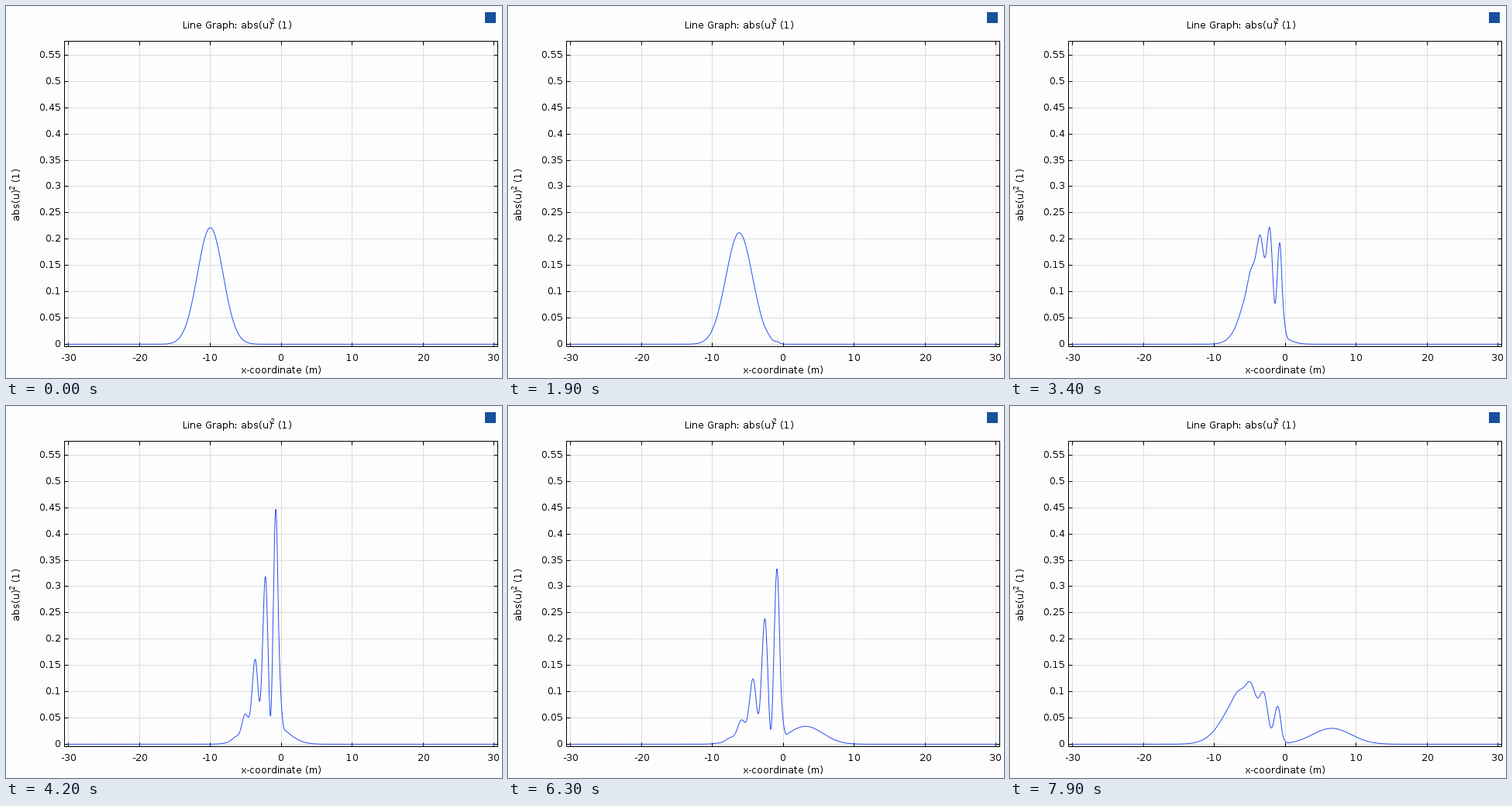
Animation of 640x480 px, one loop 8 s. Source, as a matplotlib script:

```python
import numpy as np
import matplotlib.pyplot as plt
from matplotlib.animation import FuncAnimation
from matplotlib.patches import Rectangle

W, H, DPI = 640, 480, 100
PT = 72 / DPI  # points per pixel
FRAMES, INTERVAL = 80, 100
BLUE, GRID = "#2a52f0", "#dcdcdc"
LEFT, RIGHT, TOP, BOTTOM = 75.5, 634.5, 45.5, 439.5

plt.rcParams.update({
    "font.family": "DejaVu Sans",
    "text.hinting": "default",
    "text.hinting_factor": 1,  # whole-pixel advances
})


def px(x):
    return 355.1 + 9.155 * x


def py(u):
    return 436.4 - 678.2 * u


def simulate(dt=0.1, substeps=100, loss=0.002):
    """Gaussian packet hitting a square barrier, split-step Fourier method."""
    n, dx = 2000, 0.04
    x = (np.arange(n) - n // 2) * dx
    k = 2 * np.pi * np.fft.fftfreq(n, dx)
    sigma, x0, k0 = 1.8, -10.0, 2.0
    barrier = np.where(np.abs(x) < 0.5, 3.0, 0.0)
    psi = (2 * np.pi * sigma**2) ** -0.25 * np.exp(
        -((x - x0) ** 2) / (4 * sigma**2) + 1j * k0 * x)
    h = dt / substeps
    half_v = np.exp(-0.5j * h * barrier)
    kinetic = np.exp(-0.5j * h * k**2 - 0.5 * loss * h)
    shown = np.abs(x) <= 30.001
    density = []
    for _ in range(FRAMES):
        density.append(np.abs(psi[shown]) ** 2)
        for _ in range(substeps):
            psi = half_v * np.fft.ifft(kinetic * np.fft.fft(half_v * psi))
    return x[shown], density


fig = plt.figure(figsize=(W / DPI, H / DPI), dpi=DPI, facecolor="#fdfdfd")
ax = fig.add_axes([0, 0, 1, 1])
ax.set_xlim(0, W)
ax.set_ylim(H, 0)
ax.axis("off")


def line(xs, ys, color="black", z=2):
    ax.plot(xs, ys, color=color, lw=PT, snap=False, zorder=z,
            solid_capstyle="butt", solid_joinstyle="miter")


def text(x, y, s, size=12, ha="left", rot=0):
    ax.text(x, y, s, fontsize=size * PT, ha=ha, va="baseline",
            rotation=rot, rotation_mode="anchor", color="black")


def centre(v):
    return np.floor(v) + 0.5


for v in range(-30, 31, 10):
    x = centre(px(v))
    line([x, x], [TOP, BOTTOM], GRID, 1)
    line([x, x], [BOTTOM - 5, BOTTOM])
    line([x, x], [TOP, TOP + 5])
    text(x, 458, str(v), ha="center")

for i in range(12):
    y = centre(py(0.05 * i))
    line([LEFT, RIGHT], [y, y], GRID, 1)
    line([LEFT, LEFT + 5], [y, y])
    line([RIGHT - 5, RIGHT], [y, y])
    text(70.5, y + 3.5, f"{0.05 * i:.2f}".rstrip("0").rstrip("."), ha="right")

line([LEFT, RIGHT, RIGHT, LEFT, LEFT], [TOP, TOP, BOTTOM, BOTTOM, TOP])

text(228, 29, "Line Graph: abs(u)")
text(341, 23, "2", 9)
text(351, 29, "(1)")
text(304, 474, "x-coordinate (m)")
text(17, 275.5, "abs(u)", rot=90)
text(11, 236.5, "2", 9, rot=90)
text(17, 226.5, "(1)", rot=90)

ax.add_patch(Rectangle((618, 8), 14, 14, color="#1a4f9c", lw=0))

xs, density = simulate()
curve, = ax.plot(px(xs), py(density[0]), color=BLUE, lw=PT, zorder=3)


def update(i):
    curve.set_ydata(py(density[i]))
    return curve,


anim = FuncAnimation(fig, update, frames=FRAMES, interval=INTERVAL,
                     repeat=True, repeat_delay=0)
plt.show()
```
